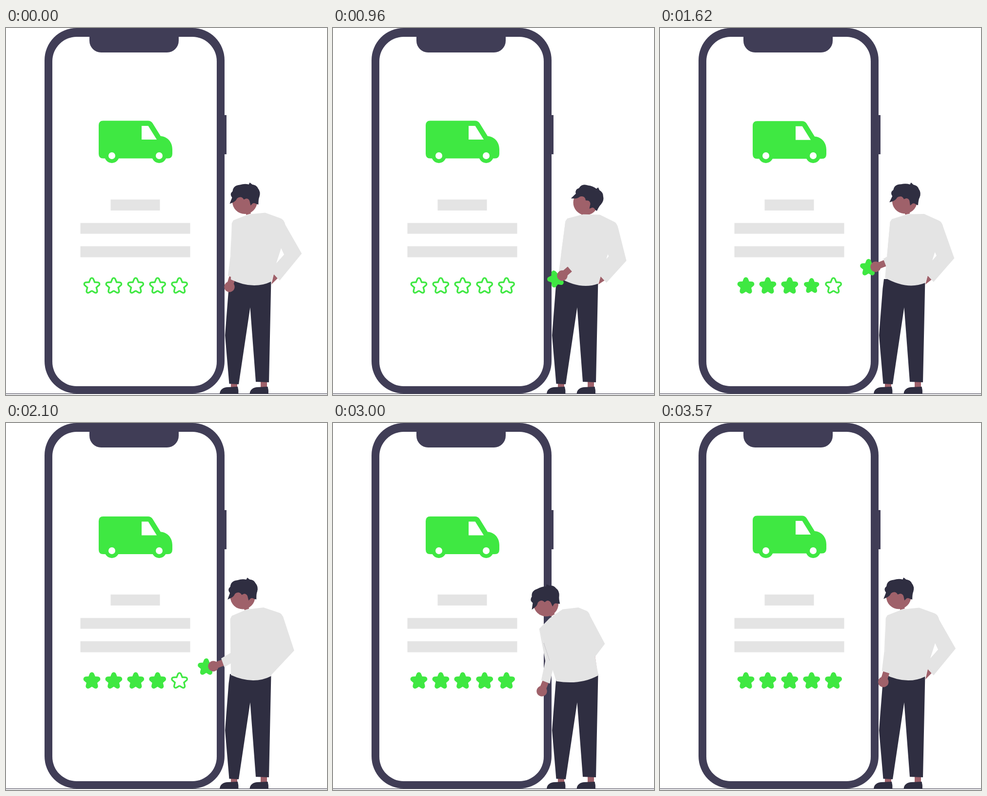
An HTML page with a canvas that plays this animation: 658 px wide and 750 px high, repeating every 3600 ms.

```html
<!DOCTYPE html>
<html lang="en">
<head>
<meta charset="utf-8">
<title>Delivery rating</title>
<style>
  html, body { margin: 0; width: 100%; height: 100%; overflow: hidden; background: #fff; }
  canvas { display: block; width: 658px; height: 750px; }
</style>
</head>
<body>
<canvas id="stage" width="658" height="750"></canvas>
<script>
const ctx = document.getElementById('stage').getContext('2d');
const LOOP = 3600, PLACED = 2580;
const GREEN = '#3fe842', FRAME = '#403d56', DARK = '#2f2e41', GREY = '#e4e4e4', SKIN = '#9f616a';
const HIP = [505, 515];

// Hand moves: start, end, x, y, forearm angle.
const REST = [458, 529, -73];
const MOVES = [
  [0, 480, 508, 503, -55],
  [480, 960, 470, 506, -41],
  [960, 1620, 442, 488, -21],
  [1620, 2100, 425, 497, -20],
  [2100, PLACED, 369.5, 525, -17],
  [2620, 3000, 428, 548, -68],
  [3000, LOOP, ...REST]
];

const rad = deg => deg * Math.PI / 180;
const mix = (p, q, k) => p.map((v, i) => v + (q[i] - v) * k);
const add = ([x, y], dx, dy) => [x + dx, y + dy];
const polar = (p, deg, len) => add(p, len * Math.cos(rad(deg)), len * Math.sin(rad(deg)));

function ease(t, from, to) {
  const s = Math.min(1, Math.max(0, (t - from) / (to - from)));
  return s * s * (3 - 2 * s);
}

function turnAbout([cx, cy], [x, y], deg) {
  const c = Math.cos(rad(deg)), s = Math.sin(rad(deg));
  return [cx + (x - cx) * c - (y - cy) * s, cy + (x - cx) * s + (y - cy) * c];
}

function poly(points, color) {
  ctx.beginPath();
  points.forEach(p => ctx.lineTo(...p));
  ctx.closePath();
  ctx.fillStyle = color;
  ctx.fill();
}

function disc(x, y, r, color) {
  ctx.beginPath();
  ctx.arc(x, y, r, 0, 7);
  ctx.fillStyle = color;
  ctx.fill();
}

function box(x, y, w, h, color, r = 0) {
  ctx.beginPath();
  ctx.roundRect(x, y, w, h, r);
  ctx.fillStyle = color;
  ctx.fill();
}

function shape(d, color) {
  ctx.fillStyle = color;
  ctx.fill(new Path2D(d));
}

function limb(from, to, width) {
  ctx.beginPath();
  ctx.moveTo(...from);
  ctx.lineTo(...to);
  ctx.lineWidth = width;
  ctx.strokeStyle = SKIN;
  ctx.stroke();
}

function at([x, y], deg, paint) {
  ctx.save();
  ctx.translate(x, y);
  ctx.rotate(rad(deg));
  paint();
  ctx.restore();
}

function star(color, round = 10) {
  poly(Array.from({ length: 10 }, (_, i) => polar([0, 0], i * 36 - 90, i % 2 ? 5.8 : 13)), color);
  ctx.lineJoin = 'round';
  ctx.lineWidth = round;
  ctx.strokeStyle = color;
  ctx.stroke();
}

function drawPhone() {
  box(448, 178, 4, 80, FRAME);
  box(79, 0, 369, 747, FRAME, 66);
  box(95, 18, 337, 714, '#fff', 50);
  box(171, 10, 183, 40, FRAME, [0, 0, 24, 24]);
  box(214.5, 350.5, 101, 22.5, GREY);
  box(152.5, 398.5, 225, 22, GREY);
  box(152.5, 446, 225, 22.5, GREY);
}

function drawVan(t) {
  const wheels = [217, 314];
  wheels.forEach(x => disc(x, 261, 15, GREEN));
  at([0, 1 - Math.cos(t / 900 * 2 * Math.PI)], 0, () => {
    shape('M199 189.5H291Q297 189.5 300.5 194.5L317 221C331 222 341 233 341 248V257Q341 266.5 332 266.5H199Q190 266.5 190 257V199Q190 189.5 199 189.5Z', GREEN);
    poly([[278, 200], [291.5, 200], [309, 228], [278, 228]], '#fff');
  });
  wheels.forEach(x => disc(x, 261, 7, '#fff'));
}

function drawRating(t) {
  for (let i = 0; i < 5; i++) {
    const begin = i < 4 ? 1050 + i * 150 : PLACED;
    at([176 + i * 44.9, 527.3], 0, () => {
      if (t < begin) {
        star(GREEN);
        star('#fff', 3.4);
        return;
      }
      const left = i < 4 ? Math.max(0, 1 - (t - begin) / 240) : 0;
      const size = 1 - .4 * left * left;
      ctx.scale(size, size);
      star(GREEN);
    });
  }
}

function drawLegs() {
  box(461, 722, 13, 14, SKIN);
  box(522, 720, 13, 16, SKIN);
  for (const x of [438, 499.5]) {
    at([x, 0], 0, () => shape('M0 748C0 739 8 734 16 734L37 733Q39 740 38.5 748Z', DARK));
  }
  poly([[459, 513], [543.5, 513], [539, 724], [512, 723], [500.5, 571], [477, 728], [457.5, 727], [449, 628], [456.5, 532]], DARK);
}

function drawHead(center, deg) {
  at(center, deg, () => {
    limb([0, 0], [8, 26], 10);
    disc(0, 0, 25.5, SKIN);
    shape('M-31 5L-26 -8Q-32 -15 -25 -21Q-24 -33 -10 -34Q-1 -37 8 -35L10 -39L15 -35Q24 -34 27 -27Q33 -20 30 -10Q28 -6 28 6L24 5Q18 1 15 5L12 8L10 -1Q8 -6 3 -6L-2 -4Q-4 -8 -8 -9Q-13 -9 -16 -6Q-18 -1 -24 2Z', DARK);
  });
}

function drawHand(hand, wrist, turn, holding) {
  limb(wrist, hand, 13);
  if (holding) at(hand, turn, () => { ctx.translate(-14.5, 2); star(GREEN); });
  limb(wrist, hand, 13);
  disc(...hand, 10.7, SKIN);
}

function drawMan(t) {
  // Lean back about the hip, bend over the phone, glance behind, hand on hip.
  const back = 1.4 + 6.6 * ease(t, 0, 700) - 8 * ease(t, 1370, 2080) + 1.4 * ease(t, 2720, LOOP);
  const bend = ease(t, 2080, PLACED) - ease(t, 2720, LOOP);
  const glance = ease(t, 200, 900) - ease(t, 1000, 1600);
  const akimbo = 1 - ease(t, 1650, 2080) + ease(t, 2900, LOOP);
  const flare = akimbo * (1.15 - .105 * back);

  // Each joint: upright position and how far bending over moves it.
  const joint = (x, y, dx, dy) => turnAbout(HIP, [x + dx * bend, y + dy * bend], back);
  const shoulder = joint(460, 400, -50, 28);
  const collar = joint(463, 394, -26, 7);
  const neckL = joint(494, 381, -32, 0);
  const neckR = joint(528, 377, -34, 0);
  const top = joint(558, 387, -51, -4);
  const rim = joint(570, 401, -57, -8);
  const elbow = add(joint(591, 465, -46, -18), 14 * flare, -6 * flare);
  const cuff = add(joint(544, 515, -10, -50), 17 * akimbo, 0);
  const notch = add(cuff, -12 * akimbo, -13 * akimbo);
  const hipR = joint(544, 517, 0, -2);
  const hipL = joint(461, 515, -4, 17);

  let arm = REST;
  for (const [from, to, ...goal] of MOVES) arm = mix(arm, goal, ease(t, from, to));
  const hand = arm.slice(0, 2), angle = arm[2];
  const wrist = polar(hand, angle, 20.5);
  const cuffA = polar(wrist, angle - 90, 9.5), cuffB = polar(wrist, angle + 90, 9.5);
  const paintHand = () => drawHand(hand, wrist, -20 * glance, t > 600 && t < PLACED);
  const behind = t < 800;

  drawLegs();
  drawHead(add(joint(485.5, 355, -65.5, 20), 10 * glance, 3 * glance), back - 1 - 16 * bend + 18 * glance);
  poly([notch, mix(notch, cuff, .65), [544, 524]], SKIN);
  if (behind) paintHand();

  ctx.beginPath();
  [shoulder, collar, neckL, neckR, top].forEach(p => ctx.lineTo(...p));
  ctx.quadraticCurveTo(rim[0] - 3, top[1] + 2, ...rim);
  [elbow, cuff, notch, hipR].forEach(p => ctx.lineTo(...p));
  ctx.quadraticCurveTo(507, 536, ...hipL);
  ctx.fillStyle = GREY;
  ctx.fill();
  poly([[1, -18], [7, -5], [-9, 13]].map(([x, y]) => [563 + x * flare, 468 + y * flare]), '#fff');

  if (!behind) paintHand();
  poly([shoulder, polar(cuffA, angle - 10, 40), cuffA, cuffB, polar(cuffB, angle - 10, 40), mix(hipL, shoulder, .4)], GREY);
}

function draw(t) {
  box(0, 0, 658, 750, '#fff');
  drawPhone();
  drawVan(t);
  drawRating(t);
  box(0, 747, 658, 1, DARK);
  drawMan(t);
}

const start = performance.now();
function tick() {
  draw((performance.now() - start) % LOOP);
  requestAnimationFrame(tick);
}
tick();
</script>
</body>
</html>
```
